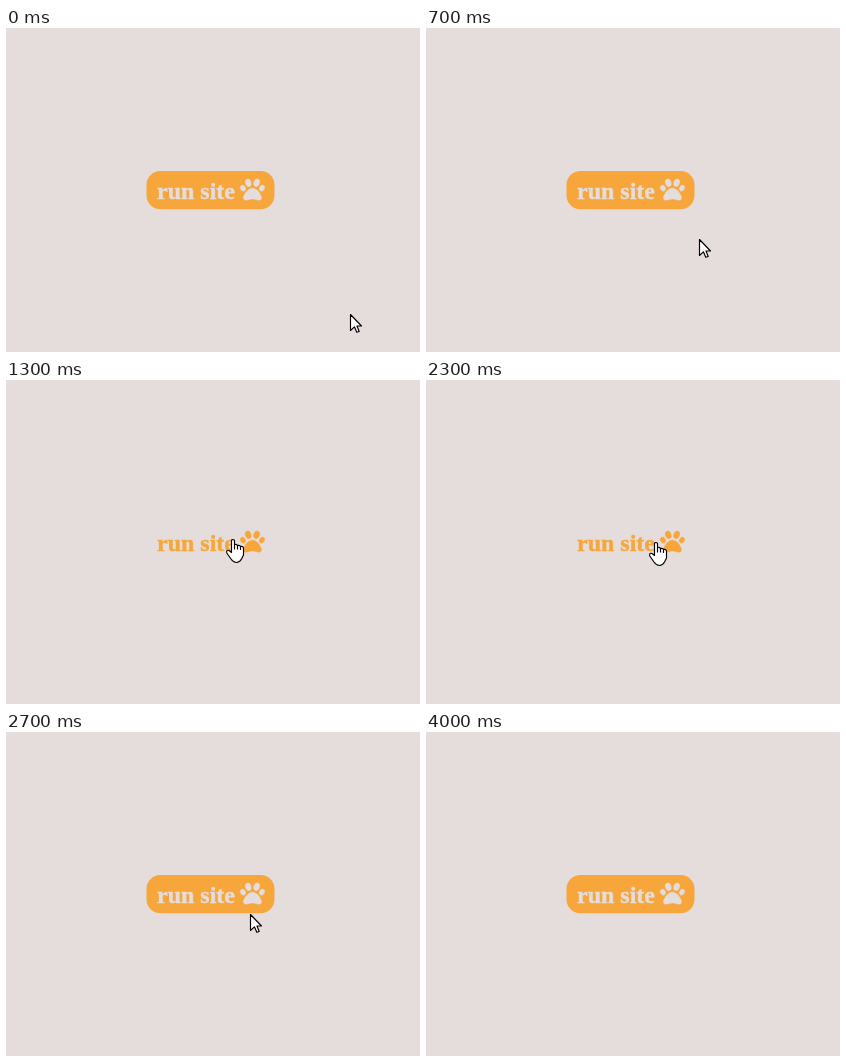
An HTML page for the animation above (4.4 s loop, 414 by 324 pixels).

```html
<!DOCTYPE html>
<html lang="en">
<head>
<meta charset="utf-8">
<title>run site</title>
<style>
  html, body { margin: 0; width: 100%; height: 100%; overflow: hidden; background: #e5dddc; }
  svg { display: block; width: 414px; height: 324px; --paper: #e5dddc; --orange: #f6a63b; }
  .box { fill: var(--orange); }
  .label { fill: var(--paper); stroke: var(--paper); font: bold 24px "Liberation Serif", "Times New Roman", serif; }
  .label text { stroke-width: .45; }
  .paw { stroke-width: 10; }
  .hover .box { fill: none; }
  .hover .label { fill: var(--orange); stroke: var(--orange); }
  .cursor { fill: #fff; stroke: #000; stroke-width: 1.15; stroke-linejoin: round; }
</style>
</head>
<body>
<svg viewBox="0 0 414 324">
  <g id="button">
    <rect class="box" x="140.5" y="143" width="128" height="38.3" rx="14"/>
    <g class="label">
      <text x="151" y="171">run site</text>
      <g class="paw" transform="translate(234.3 149.5) scale(.0475)">
        <ellipse rx="50" ry="66" transform="translate(56 224) rotate(-30)"/>
        <ellipse rx="60" ry="82" transform="translate(168 111) rotate(-18)"/>
        <ellipse rx="60" ry="82" transform="translate(344 111) rotate(18)"/>
        <ellipse rx="50" ry="66" transform="translate(456 224) rotate(30)"/>
        <path d="M69 401C122 260 215 224 256 224S390 260 443 401C460 450 425 490 367 476L279 454Q256 448 233 454L145 476C87 490 52 450 69 401Z"/>
      </g>
    </g>
  </g>
  <g id="cursor" class="cursor">
    <path id="arrow" d="M.5 .5V16.5L4.4 12.8 6.8 18.3 9.2 17.5 7 12H11.5Z"/>
    <g id="hand" transform="translate(-6 0)">
      <path d="M5.5 13.5V1.5Q5.5 .5 7 .5T8.5 1.5V5.5Q11 4.8 11.5 6.5Q14 5.8 14.5 7.5Q17.5 7 17.5 9.5V16L15.5 20Q13.5 23.5 10.5 23.5Q7.5 23.5 5 20L.8 14Q0 10.5 3 11.5Z"/>
      <path fill="none" d="M8.5 5.5V10.5M11.5 6.5V10.5M14.5 7.5V11"/>
    </g>
  </g>
</svg>
<script>
  const LOOP = 4400, TICK = 100, GONE = 40;
  // key points of the pointer tip: [tick, x, y]
  const keys = [
    [0, 344, 286], [2, 340, 283], [4, 325, 268], [9, 239, 173], [13, 226, 159],
    [22.3, 226, 159], [27, 244, 182], [32, 261, 201], [38, 261, 201], [39, 264, 218]
  ];
  const $ = id => document.getElementById(id);
  const show = (id, on) => $(id).setAttribute("display", on ? "inline" : "none");

  function tipAt(tick) {
    const i = Math.max(1, keys.findIndex(key => key[0] >= tick));
    const [t0, ...from] = keys[i - 1], [t1, ...to] = keys[i];
    const k = (tick - t0) / (t1 - t0);
    return from.map((v, n) => Math.round(v + (to[n] - v) * k));
  }

  function draw(now) {
    const tick = Math.floor(now % LOOP / TICK);
    const visible = tick < GONE;
    const [x, y] = visible ? tipAt(tick) : [0, 0];
    const hover = x > 140 && x < 269 && y > 143 && y < 182;
    $("cursor").setAttribute("transform", `translate(${x} ${y})`);
    show("cursor", visible);
    show("arrow", !hover);
    show("hand", hover);
    $("button").setAttribute("class", hover ? "hover" : "");
  }

  function loop() {
    draw(performance.now());
    requestAnimationFrame(loop);
  }
  loop();
</script>
</body>
</html>
```
